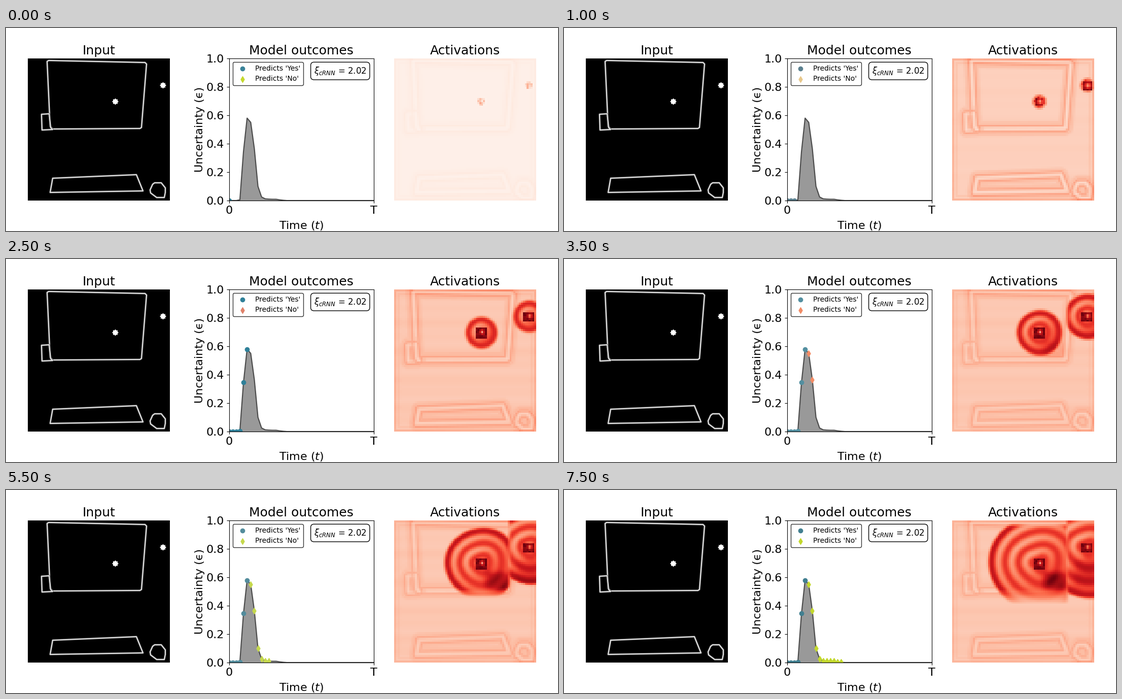
A matplotlib script for the animation above (8 s loop, 1088 by 400 pixels).

```python
import numpy as np
import matplotlib.pyplot as plt
from matplotlib.animation import FuncAnimation
from matplotlib.patches import Polygon

W, H, DPI = 1088, 400, 100
SIZE, CELLS, STEPS = 280, 75, 16

SCREEN = [(38, 6), (41, 4), (231, 8), (234, 11), (224, 136), (221, 138), (49, 139), (44, 134)]
BOX = [(27, 110), (42, 109), (45, 136), (49, 140), (28, 141)]
KEYBOARD = [(49, 236), (214, 229), (227, 261), (44, 264)]
MOUSE = [(250, 245), (263, 245), (271, 255), (271, 264), (269, 274),
         (254, 274), (242, 265), (241, 259), (246, 248)]
SHAPES = [SCREEN, BOX, KEYBOARD, MOUSE]
DOTS = [(172, 85), (266, 53)]

CURVE = [0, 0, 0, .005, .345, .58, .55, .365, .1, .025, .012, .01, .009, .009, .005, .002]

fig = plt.figure(figsize=(W / DPI, H / DPI), dpi=DPI, facecolor="white")


def add_axes(x, w, title):
    ax = fig.add_axes([x / W, 60 / H, w / W, SIZE / H])
    ax.set_title(title, fontsize=18)
    return ax


def add_panel(x, title):
    ax = add_axes(x, SIZE, title)
    ax.set(xlim=(0, SIZE), ylim=(SIZE, 0))
    ax.axis("off")
    return ax


def star(cx, cy, r=6.5, points=8):
    a = np.arange(2 * points) * np.pi / points
    rad = np.where(np.arange(2 * points) % 2, 0.72 * r, r)
    return np.column_stack([cx + rad * np.cos(a), cy + rad * np.sin(a)])


# Input panel
ax_in = add_panel(43, "Input")
ax_in.add_patch(plt.Rectangle((0, 0), SIZE, SIZE, color="black", lw=0))
for pts in SHAPES:
    ax_in.add_patch(Polygon(pts, fill=False, ec="0.4", lw=2.6, joinstyle="round"))
    ax_in.add_patch(Polygon(pts, fill=False, ec="0.92", lw=1.3, joinstyle="round"))
for x, y in DOTS:
    ax_in.add_patch(Polygon(star(x + 0.5, y), fc="white", lw=0))

# Uncertainty plot
ax = add_axes(439.6, 285, "Model outcomes")
t = np.arange(41)
eps = np.zeros(41)
eps[:len(CURVE)] = CURVE
ax.fill_between(t, eps, color="#999999", lw=0)
ax.plot(t, eps, color="#4d4d4d", lw=1.6)
yes = ax.scatter([], [], marker="o", zorder=2.4, color="#417f90", label="Predicts 'Yes'")
no = ax.scatter([], [], marker="d", zorder=2.4, color="#c5d92d", label="Predicts 'No'")
ax.set(xlim=(0, 40), ylim=(0, 1))
ax.set_xticks([0, 40], ["0", "T"])
ax.tick_params(labelsize=16)
ax.set_xlabel("Time ($t$)", fontsize=16, labelpad=6)
ax.set_ylabel("Uncertainty (\u03f5)", fontsize=16, labelpad=2)
legend = ax.legend(loc="upper left", edgecolor="black", fontsize=10)
keys = legend.legend_handles
ax.text(0.769, 0.912, r"$\xi_{cRNN}$ = 2.02", transform=ax.transAxes, fontsize=12,
        ha="center", va="center", bbox=dict(boxstyle="round,pad=0.38", fc="white", ec="black"))

# Activation panel
ax_act = add_panel(765, "Activations")
image = ax_act.imshow(np.zeros((CELLS, CELLS)), cmap="Reds", vmin=0, vmax=1,
                      extent=(0, SIZE, SIZE, 0), interpolation="nearest", aspect="auto")
grid = (np.arange(CELLS) + 0.5) * SIZE / CELLS
X, Y = np.meshgrid(grid, grid)
NOISE = np.random.default_rng(4).uniform(-1, 1, X.shape)


def bump(x, mid, width):
    return np.exp(-((x - mid) / width) ** 2)


def ramp(x, width):
    return np.clip(x / width, 0, 1)


def outline_distance(pts):
    best = np.full(X.shape, 1e9)
    for (x0, y0), (x1, y1) in zip(pts, pts[1:] + pts[:1]):
        dx, dy = x1 - x0, y1 - y0
        s = np.clip(((X - x0) * dx + (Y - y0) * dy) / (dx * dx + dy * dy), 0, 1)
        best = np.minimum(best, np.hypot(X - x0 - s * dx, Y - y0 - s * dy))
    return best


def echo(d):
    return bump(d, 6, 2.8) - 0.25 * bump(d, 0, 3) + 0.35 * bump(d, 12, 3)


ECHOES = [echo(outline_distance(p)) for p in SHAPES]
EDGES = np.max(ECHOES, axis=0) + np.min(ECHOES, axis=0)
RIM = np.minimum(np.minimum(X, SIZE - X), np.minimum(Y, SIZE - Y))
FRAME = bump(RIM, 1, 2.5) + 0.35 * bump(RIM, 9, 2.5)
STREAKS = np.sin(Y / 6) * np.sin(Y / 17 + 1)


def inside_screen(R):
    leak = 6 + 0.5 * max(0, R - 55)
    return ramp(231 - X, 8) * ramp(Y - 5, 9) * (1 - ramp(Y - 135, leak))


def beside_screen(R):
    return ramp(X - 223, 8)


def add_wave(v, k, center, region):
    R = 9 + 4 * k if k < 3 else 3 + 6.7 * k
    dx, dy = X - center[0], Y - center[1]
    near = np.hypot(dx, dy)
    r = near + 0.25 * max(0, k - 5) * np.sin(3 * np.arctan2(dy, dx) + 1) * ramp(near, 20)
    u = R - r
    if k < 3:
        body = (0.28, 0.72, 0.66)[k] + NOISE * 0.12
    else:
        # Rings show best to the upper left and blur to the lower right.
        side = -(dx + dy) / (near + 6) / np.sqrt(2)
        period = 22 + 0.6 * max(0, k - 7)
        swing = 0.11 + 0.07 * side
        body = 0.55 - 0.07 * side + swing * np.cos(2 * np.pi * (u - 11) / period)
        body = body + 0.12 * bump(u, 12, 9) * ramp(k - 3, 6)
    m = ramp(u, 4 if k < 2 else 9)
    m = m * m * (3 - 2 * m) * region(R)
    v = v * (1 - m) + body * m
    if k > 1:
        core = np.maximum(abs(dx), abs(dy - 1)) < (8.5 if k == 2 else 10.5)
        v = np.where(core, 0.96 + 0.04 * NOISE, v)
    spot = 5.5 if k < 4 else 3.8
    glow = bump(np.hypot(dx - 1.5, dy + (k > 3)), 0, spot)
    return v - (0.12 if k == 0 else 0.38 if k == 1 else 0.6) * glow


def activation(k):
    base = 0.035 + 0.175 * (1 - np.exp(-0.9 * k))
    gain = 0.03 + 0.1 * (1 - np.exp(-2 * k)) - 0.045 * np.clip((k - 3) / 4, 0, 1)
    v = base + gain * (EDGES + 0.8 * FRAME) + 0.012 * min(1, k / 4) * STREAKS
    for center, region in zip(DOTS, (inside_screen, beside_screen)):
        v = add_wave(v, k, center, region)
    # The lower right corner of the screen fills up.
    fill = 0.32 * ramp(k - 5, 8)
    corner = np.exp(-((X - 202) / 22) ** 4 - ((Y - 119) / 18) ** 4)
    side = np.exp(-((X - 262) / 26) ** 4 - ((Y - 105) / 28) ** 4)
    v = v + fill * corner + 0.5 * fill * side * (v > 0.4)
    return np.clip(v, 0, 1)


def tones(k):
    if k == 0:
        return "#3a8399", "#c5d92d"
    if k < 3:
        return "#5b808f", "#e8c88c"
    if k < 7:
        return "#2f8099", "#e0826a"
    if k < 11:
        return "#538fa0", "#f28c66"
    if k < 13:
        return "#538c9c", "#c5d84c"
    return "#417f90", "#c3d82c"


def update(k):
    n = k + 1
    pts = np.column_stack([t[:n], eps[:n]])
    yes.set_offsets(pts[:6])
    no.set_offsets(pts[6:])
    for key, dots, color in zip(keys, (yes, no), tones(k)):
        key.set_color(color)
        dots.set_color(color)
    image.set_data(activation(k))
    return yes, no, image


anim = FuncAnimation(fig, update, frames=STEPS, interval=500, repeat=True, repeat_delay=0)
plt.show()
```
